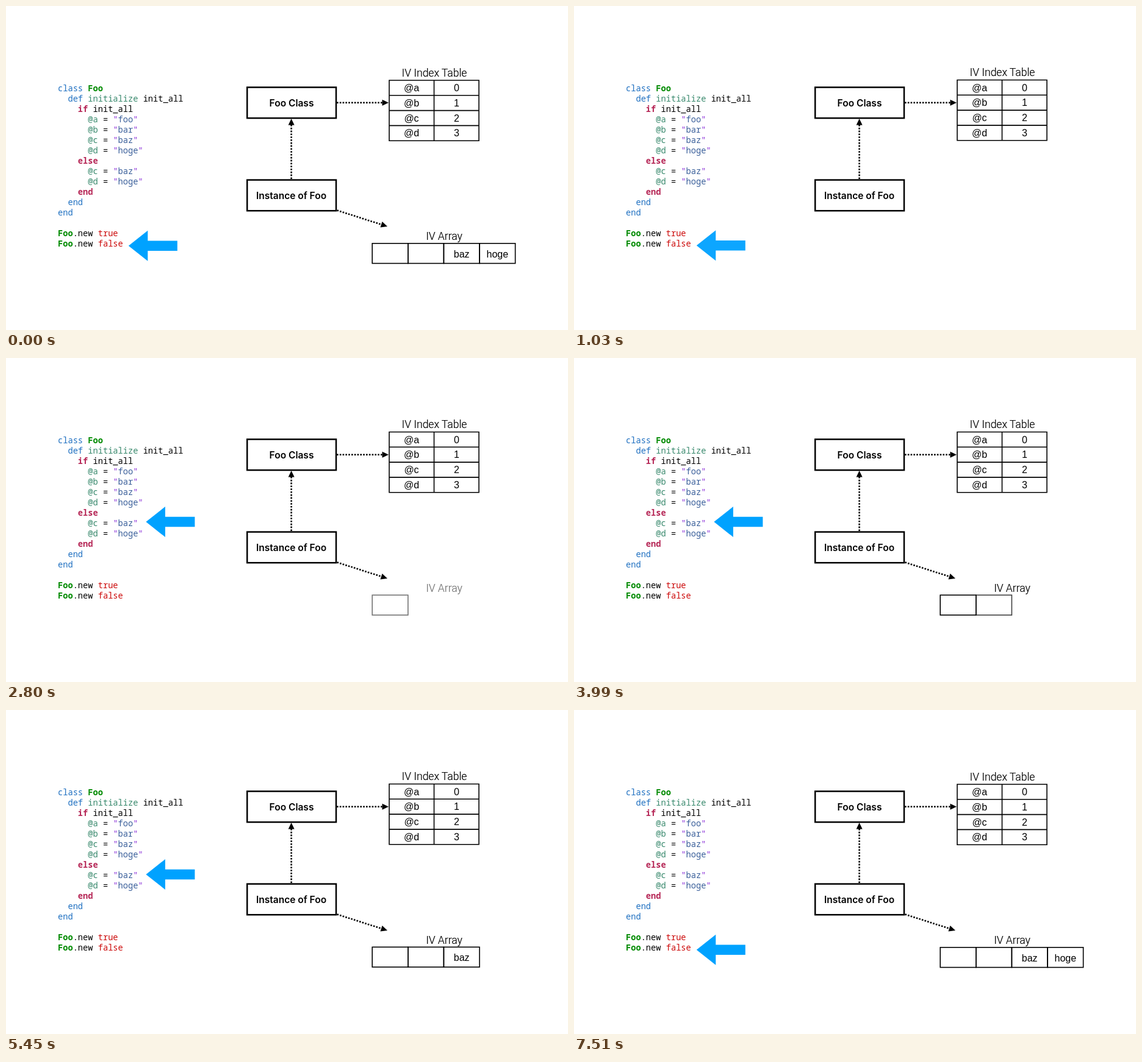
These frames come from a looping animation (921x532 px, 7.83 s). An HTML page:

```html
<!DOCTYPE html>
<html lang="en">
<head>
<meta charset="utf-8">
<title>Instance variable table</title>
<style>
  html, body { margin: 0; width: 100%; height: 100%; overflow: hidden; background: #fff; }
  svg { display: block; width: 921px; height: 532px; }
  .code { font: 13.7px "Noto Sans Mono", monospace; white-space: pre; }
  .box { fill: none; stroke: #000; stroke-width: 2.5; }
  .grid { fill: none; stroke: #000; stroke-width: 1.6; }
  .label { font: 600 15.5px Inter, sans-serif; text-anchor: middle; }
  .title { font: 300 17.5px Roboto, sans-serif; text-anchor: middle; stroke: #000; stroke-width: 0.2; }
  .cell { font: 16px "Liberation Sans", Arial, sans-serif; text-anchor: middle; }
  .dots { stroke: #000; stroke-width: 2.6; stroke-dasharray: 2.6 2.2; }
  .key { fill: #1f70c1; }
  .name { fill: #008a00; font-weight: bold; }
  .branch { fill: #b52555; font-weight: bold; }
  .ivar { fill: #3a8a6e; }
  .quote { fill: #8b30d8; }
  .string { fill: #3a5f9a; }
  .bool { fill: #cc0a0a; }
</style>
</head>
<body>
<svg viewBox="0 0 921 532">
  <g id="code"></g>

  <rect class="box" x="395.2" y="133.5" width="145.8" height="50.6"/>
  <text class="label" x="468" y="164.5">Foo Class</text>
  <rect class="box" x="395.2" y="285.6" width="145.8" height="50.6"/>
  <text class="label" x="467.5" y="316.5">Instance of Foo</text>
  <g id="links"></g>

  <g id="table">
    <text class="title" x="702" y="115.5">IV Index Table</text>
    <path class="grid" d="M628 122h147v99.2h-147zM701.5 122v99.2M628 146.8h147m0 24.8h-147m0 24.8h147"/>
  </g>
  <g id="array"><text class="title" id="arrayTitle" x="718" y="384">IV Array</text></g>

  <path id="pointer" fill="#00a2ff" d="M0 25 31.5 0V16.7H80V33.2H31.5V50Z"/>
</svg>
<script>
const LOOP = 7830, STEP = 146.7;
const $ = id => document.getElementById(id);

function add(parent, tag, attrs, text = "") {
  const node = document.createElementNS("http://www.w3.org/2000/svg", tag);
  for (const key in attrs) node.setAttribute(key, attrs[key]);
  node.textContent = text;
  return parent.appendChild(node);
}

// Code listing
const program = `class Foo
  def initialize init_all
    if init_all
      @a = "foo"
      @b = "bar"
      @c = "baz"
      @d = "hoge"
    else
      @c = "baz"
      @d = "hoge"
    end
  end
end

Foo.new true
Foo.new false`;

const styles = [
  [/^(class|def|end)$/, "key"], [/^Foo$/, "name"], [/^(if|else)$/, "branch"],
  [/^(@\w|initialize)$/, "ivar"], [/^"$/, "quote"],
  [/^(foo|bar|baz|hoge)$/, "string"], [/^(true|false)$/, "bool"]
];

program.split("\n").forEach((line, i) => {
  const row = add($("code"), "text", { class: "code", x: 85, y: 139.5 + i * 17 });
  for (const word of line.match(/@?\w+|"|\s+|[^\w\s"]/g) || []) {
    const style = line === "    end" ? "branch" : (styles.find(([test]) => test.test(word)) || [])[1];
    add(row, "tspan", { class: style || "" }, word);
  }
});

// Dotted connectors
function link(x1, y1, x2, y2) {
  const length = Math.hypot(x2 - x1, y2 - y1);
  const angle = Math.atan2(y2 - y1, x2 - x1) * 180 / Math.PI;
  const group = add($("links"), "g", { transform: `translate(${x1} ${y1}) rotate(${angle})` });
  add(group, "line", { class: "dots", x2: length - 10 });
  add(group, "path", { d: `M${length} 0l-10.5 -5v10z` });
  return group;
}
link(542, 158.8, 627, 158.8);
link(467.6, 284, 467.6, 185);
const arrayLink = link(542.5, 335.5, 625, 362);

// Index table rows
["@a", "@b", "@c", "@d"].forEach((name, i) => {
  const y = 140 + i * 24.8;
  add($("table"), "text", { class: "cell", x: 664.5, y }, name);
  add($("table"), "text", { class: "cell", x: 738.5, y }, i);
});

// Array cells
const cells = ["", "", "baz", "hoge"].map((value, i) => {
  const x = 600.2 + i * 58.6;
  const group = add($("array"), "g", {});
  add(group, "rect", { class: "grid", x, y: 389.8, width: 58.6, height: 32.8 });
  add(group, "text", { class: "cell", x: x + 29.3, y: 412.5 }, value);
  return group;
});

// Timing: everything advances in ticks, counted from 1 at the start time
const clamp = v => Math.max(0, Math.min(1, v));
const ticks = (t, start) => t < start ? 0 : Math.floor((t - start) / STEP + 0.05) + 1;
const fade = (t, start) => clamp(ticks(t, start) * 0.2 - 0.05);
const glide = (t, start) => (1 - Math.cos(Math.PI * clamp(ticks(t, start) / 7))) / 2;
const show = (node, opacity) => node.setAttribute("opacity", opacity);
const move = (node, x, y) => node.setAttribute("transform", `translate(${x} ${y})`);

const cellStarts = [2510, 3540, 4580, 6630];

function draw(t) {
  const resting = t < 150 || t >= 7510;
  const toBody = resting ? 0 : glide(t, 1330);
  const toNext = resting ? 0 : glide(t, 5450);
  const lift = resting ? 0 : -0.5;

  move($("pointer"), 200.8 + 28.6 * toBody, 368.8 + lift - 124.2 * toBody + 17.4 * toNext);
  move($("table"), 0, lift);
  move($("array"), 0, lift);

  show($("pointer"), resting ? 1 : fade(t, 450));
  show(arrayLink, resting ? 1 : glide(t, 1330));
  show($("arrayTitle"), resting ? 1 : fade(t, cellStarts[0]));
  cells.forEach((cell, i) => show(cell, resting ? 1 : fade(t, cellStarts[i])));
}

const began = performance.now();
function frame() {
  draw((performance.now() - began) % LOOP);
  requestAnimationFrame(frame);
}
frame();
</script>
</body>
</html>
```
